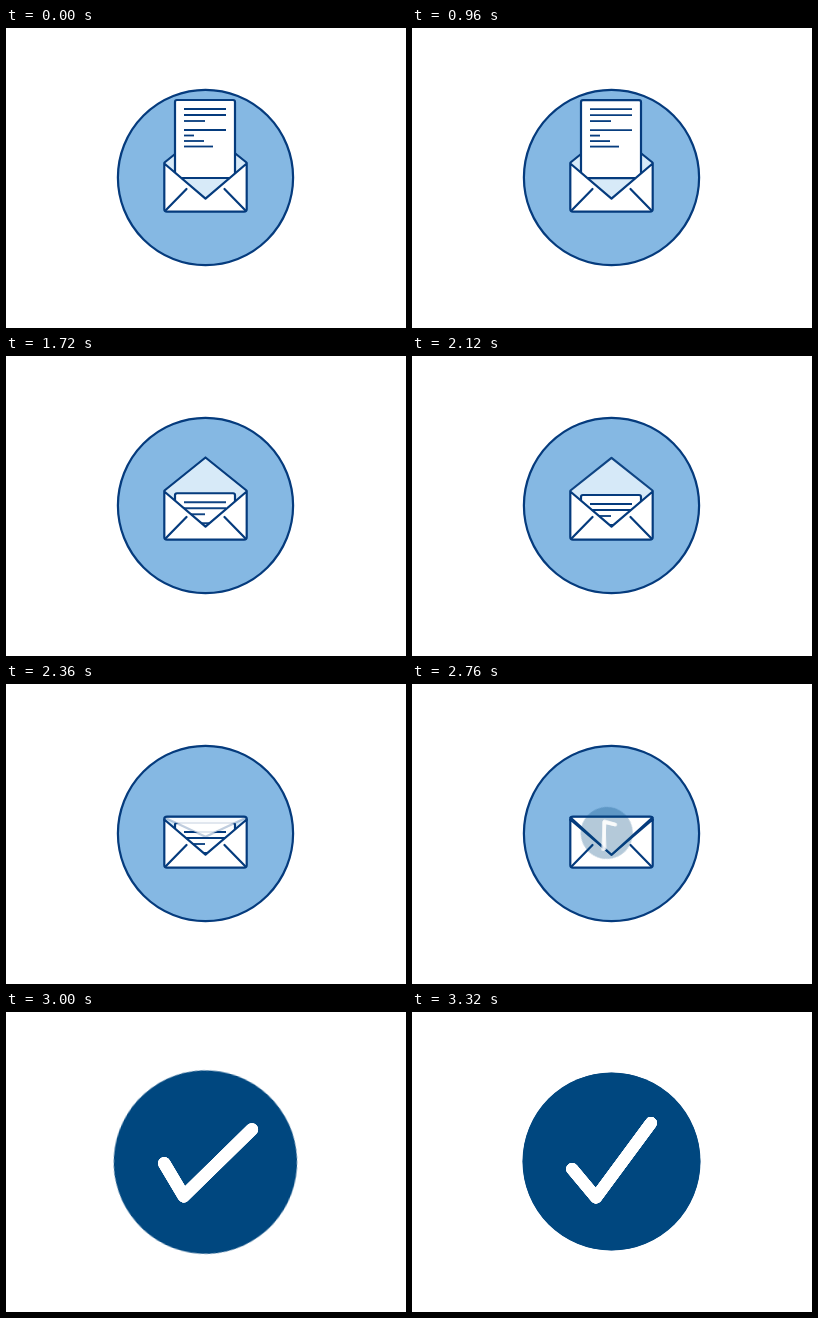
These frames come from a looping animation (400x300 px, 4960 ms). An HTML page:

```html
<!DOCTYPE html>
<html lang="en">
<head>
<meta charset="utf-8">
<title>Letter sent</title>
<style>
  html, body { margin: 0; width: 100%; height: 100%; overflow: hidden; background: #fff; }
  svg { display: block; width: 100vw; height: 100vh; }
  .ink { stroke: #053b7d; stroke-width: 2.2; stroke-linejoin: round; stroke-linecap: round; }
</style>
</head>
<body>
<svg viewBox="0 0 400 300">
  <defs>
    <clipPath id="mouth"><rect x="150" y="60" width="100" height="118"/></clipPath>
  </defs>
  <circle class="ink" cx="199.5" cy="149.5" r="87.6" fill="#85b8e3"/>

  <path d="M158.5 134H240.5V170H158.5Z" fill="#d7eaf8"/>
  <path id="flapUp" class="ink" fill="#d7eaf8"/>
  <g clip-path="url(#mouth)">
    <g id="letter">
      <rect class="ink" x="169" y="0" width="60" height="78" rx="2" fill="#fff"/>
      <g id="lines" stroke="#053b7d"></g>
    </g>
  </g>
  <path class="ink" fill="#fff" d="M158.3 135.5L199.5 170.7L240.7 135.5V181Q240.7 183.7 238 183.7H161Q158.3 183.7 158.3 181Z"/>
  <path class="ink" fill="none" d="M159.5 182.5L180.5 161M239.5 182.5L218.5 161"/>
  <g id="flapDown">
    <path id="flapFill" class="ink" fill="#fff"/>
    <path class="ink" fill="none" d="M158.3 136V135Q158.3 132.6 161 132.6H238Q240.7 132.6 240.7 135V136"/>
  </g>

  <g id="badge">
    <circle id="disc" r="89" fill="#00477f"/>
    <g id="ticks"></g>
  </g>
</svg>
<script>
const LOOP = 4960, STEP = 40;
const $ = id => document.getElementById(id);
const clamp = x => Math.min(1, Math.max(0, x));
const span = (t, a, b) => clamp((t - a) / (b - a));

function add(parent, tag, attrs) {
  const el = document.createElementNS('http://www.w3.org/2000/svg', tag);
  for (const k in attrs) el.setAttribute(k, attrs[k]);
  return parent.appendChild(el);
}

// Ease in and out with horizontal handles at x1 and x2
function ease(x, x1, x2) {
  let lo = 0, hi = 1, s = x;
  for (let i = 0; i < 24; i++) {
    s = (lo + hi) / 2;
    const r = 1 - s;
    if (3 * x1 * s * r * r + 3 * x2 * s * s * r + s * s * s < x) lo = s; else hi = s;
  }
  return s * s * (3 - 2 * s);
}

function backOut(x) {
  const c = 1.35, r = x - 1;
  return 1 + (c + 1) * r * r * r + c * r * r;
}

const letterTop = t => 72 + 67 * ease(span(t, 930, 1920), 0.48, 0.2);
const flapTip = t => 101.5 + 69.2 * ease(span(t, 2080, 2560), 0.65, 0.32);
const pop = t => backOut(span(t, 2715, 3320));
const speed = (f, t) => Math.abs(f(t + 10) - f(t - 10)) / 20;

[[9, 42], [15, 42], [21, 21], [30, 42], [35.5, 10], [41, 20], [46.5, 29]].forEach(([y, w]) =>
  add($('lines'), 'path', { d: `M178 ${y}h${w}` }));

const ticks = [-2, -1, 0, 1, 2].map(offset => ({
  offset,
  el: add($('ticks'), 'path', {
    d: 'M-39.3 7.5L-15.5 36L39.5 -38.5', fill: 'none', stroke: '#fff',
    'stroke-width': 12, 'stroke-linecap': 'round', 'stroke-linejoin': 'round'
  })
}));

// Scale and spin about a point slightly left of the centre
const spin = p =>
  `translate(195.8 148.6) rotate(${-305 * (1 - p)}) scale(${Math.max(0, p)}) translate(3.7 .9)`;

function drawLetter(t) {
  const blur = clamp(speed(letterTop, t) / 0.13);
  $('letter').setAttribute('transform', `translate(0 ${letterTop(t)})`);
  $('lines').setAttribute('stroke-width', 1.8 + 0.7 * blur);
  $('lines').setAttribute('stroke-opacity', 1 - 0.32 * blur);
}

function drawFlap(t) {
  const tip = flapTip(t), down = tip > 134;
  const blur = clamp(speed(flapTip, t) / 0.25);
  $('flapUp').style.display = down ? 'none' : '';
  $('flapDown').style.display = down ? '' : 'none';
  const flap = $(down ? 'flapFill' : 'flapUp');
  const y = down ? 133.5 : 134.5;
  flap.setAttribute('d', `M158.5 ${y}L199.5 ${tip}L240.5 ${y}`);
  flap.setAttribute('stroke-opacity', 1 - 0.75 * blur);
  flap.setAttribute('fill-opacity', 1 - 0.12 * blur);
}

function drawBadge(t) {
  const p = pop(t), shown = t >= 2740;
  $('badge').style.display = shown ? '' : 'none';
  if (!shown) return;
  const rate = t < 3300 ? speed(pop, t) : 0;
  const blur = clamp(rate / 0.004);
  const disc = $('disc');
  disc.setAttribute('transform', spin(p));
  disc.setAttribute('fill-opacity', clamp(p));
  disc.style.filter = blur > 0.15 ? `blur(${1.3 * blur}px)` : 'none';
  for (const { offset, el } of ticks) {
    el.setAttribute('transform', spin(pop(t + offset * blur)));
    el.setAttribute('stroke-opacity', 1 - 0.6 * blur);
  }
}

function draw(t) {
  drawLetter(t);
  drawFlap(t);
  drawBadge(t);
}

const start = performance.now();
function tick() {
  const t = (performance.now() - start) % LOOP;
  draw(Math.floor(t / STEP) * STEP);
  requestAnimationFrame(tick);
}
draw(0);
requestAnimationFrame(tick);
</script>
</body>
</html>
```
